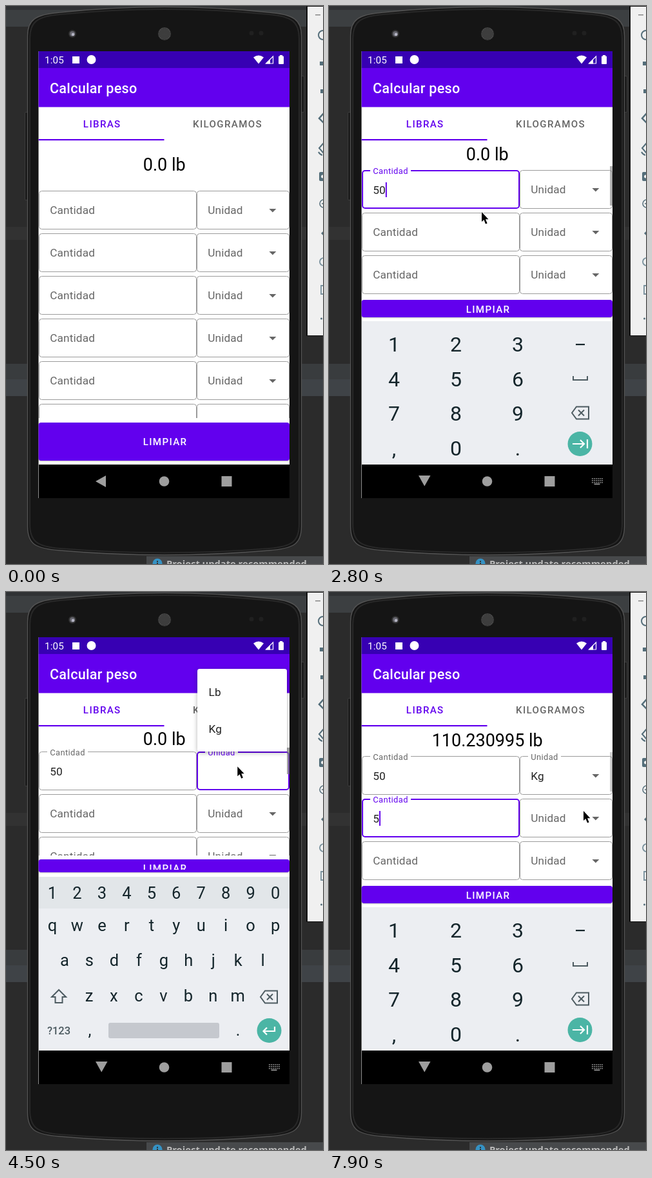
Recreate the animation shown at these times as an HTML page with a canvas. Size 492 px wide and 864 px high, loop 8000 ms.

```html
<!DOCTYPE html>
<html lang="es">
<head>
<meta charset="utf-8">
<title>Calcular peso</title>
<style>
html, body { margin: 0; width: 100%; height: 100%; overflow: hidden; background: #2b2b2b; }
canvas { display: block; }
</style>
</head>
<body>
<canvas id="stage" width="492" height="864"></canvas>
<script>
const ctx = document.getElementById('stage').getContext('2d');
const LOOP = 8000;
const PURPLE = '#6200ee', HINT = '#666', INK = '#212121', KEY = '#14252b', ICON = '#4d5b61', TEAL = '#4bb5a5';

const T = {
  focus1: 1050, type5: 2600, type0: 2800, openMenu: 4012, letters: 4300,
  pickKg: 5200, closeMenu: 5250, focus2: 5750, digits: 5950, typeSecond: 6880
};
const LAYOUT = {
  none: { total: 255, row: 286, clip: 638, button: 645, height: 59, label: 680, keyboard: 710 },
  digits: { total: 239, row: 254, clip: 448, button: 455, height: 27, label: 475, keyboard: 488 },
  letters: { total: 237, row: 247, clip: 408, button: 414, height: 20, label: 433, keyboard: 441 }
};
// time, x, y of the pointer tip
const POINTER = [
  [100, 500, 520], [700, 237, 319], [3300, 237, 319], [3800, 363, 272], [4100, 360, 272],
  [4450, 360, 272], [4950, 335, 208], [5180, 335, 208], [5400, 173, 332], [5650, 153, 342],
  [7000, 153, 342], [7700, 395, 339], [8000, 395, 339]
];

const clamp = v => Math.max(0, Math.min(1, v));
const ramp = (t, from, to) => clamp((t - from) / (to - from));
const ease = p => p * p * (3 - 2 * p);
const mix = (a, b, p) => a + (b - a) * p;

function rect(x, y, w, h, color) {
  ctx.fillStyle = color;
  ctx.fillRect(x, y, w, h);
}
function round(x, y, w, h, r, color) {
  ctx.fillStyle = color;
  ctx.beginPath();
  ctx.roundRect(x, y, w, h, r);
  ctx.fill();
}
function circle(x, y, r, color) {
  ctx.fillStyle = color;
  ctx.beginPath();
  ctx.arc(x, y, r, 0, 7);
  ctx.fill();
}
function fill(d, color) {
  ctx.fillStyle = color;
  ctx.fill(new Path2D(d));
}
function stroke(d, color, width = 2) {
  ctx.strokeStyle = color;
  ctx.lineWidth = width;
  ctx.stroke(new Path2D(d));
}
function text(str, x, y, size, color, { weight = 400, align = 'left', spacing = 0, family = 'Roboto' } = {}) {
  ctx.font = `${weight} ${size}px ${family}, sans-serif`;
  ctx.letterSpacing = spacing + 'px';
  ctx.textAlign = align;
  ctx.fillStyle = color;
  ctx.fillText(str, x, y);
}
function clipped(x, y, w, h, draw) {
  ctx.save();
  ctx.beginPath();
  ctx.rect(x, y, w, h);
  ctx.clip();
  draw();
  ctx.restore();
}
const caps = (str, x, y, color) => text(str, x, y, 15.1, color, { weight: 500, align: 'center', spacing: 1.35 });

function drawDesktop() {
  rect(0, 0, 492, 864, '#2b2b2b');
  rect(0, 0, 492, 6, '#303234');
  rect(0, 6, 492, 26, '#3c3f41');
  rect(0, 342, 492, 20, '#323232');
  rect(0, 554, 492, 24, '#393c3e');
  rect(0, 578, 492, 26, '#3f4347');
  rect(218, 852, 274, 12, '#47494b');
  circle(235, 863, 7.5, '#3592c4');
  rect(234, 859, 2, 2, '#333');
  rect(234, 862, 2, 2, '#333');
  text('Project update recommended', 249, 868.5, 14.7, '#bbb', { weight: 700, family: 'Open Sans' });
}

function drawToolbar() {
  rect(466, 0, 26, 511, '#111');
  rect(468, 1, 24, 509, '#f0f0f0');
  const c = '#546e7a';
  rect(480, 13, 8, 1.5, '#888');
  stroke('M492 38 A7 7 0 0 0 492 52', c);
  rect(487, 86, 5, 6, c);
  rect(488, 129, 4, 6, c);
  stroke('M493 166 L486 174 L493 181', c, 2.5);
  stroke('M493 212 L486 220 L493 228 M485 226 Q487 230 491 231', c);
  round(486, 257, 8, 14, 2, c);
  circle(491.5, 264, 2.5, '#f0f0f0');
  stroke('M493 300 A6 6 0 0 0 493 312 M490 306 H492', c, 1.5);
  fill('M489 352 L493 348 V356 Z', c);
  stroke('M493 390 A6 6 0 0 0 493 402', '#78909c', 1.8);
  stroke('M493 433 H489 V446 H493', '#78909c', 1.8);
  circle(489.5, 484, 1.5, c);
}

function drawPhone() {
  round(29, 164, 6, 137, 2, '#3b3b3b');
  round(30, 165, 3, 135, 1, '#1a1a1a');
  round(457, 108, 6, 57, 2, '#3b3b3b');
  round(458, 109, 4, 55, 1, '#1a1a1a');
  const body = 'M33.5 46 C33.5 22 45 13 84 10 Q246 -7 408 10 C447 13 458.5 22 458.5 46 V806 C458.5 833 447 840 408 843 Q246 857 84 843 C45 840 33.5 833 33.5 806 Z';
  fill(body, '#151515');
  stroke(body, '#525252', 1.4);
  stroke('M37 50 C37 25 48 16 84 13 Q246 -3 408 13 C444 16 455 25 455 50 V802 C455 829 444 837 408 840 Q246 853 84 840 C48 837 37 829 37 802 Z', '#282828', 2);
  circle(103, 43, 6, '#303030');
  circle(103, 43, 4, '#65656d');
  circle(104, 44, 2.3, '#b5b5c4');
  circle(381, 42, 3.5, '#202020');
  circle(396, 42, 3.5, '#202020');
  circle(246, 43, 10, '#464646');
  for (let i = -4; i <= 4; i++)
    for (let j = -4; j <= 4; j++)
      if (i * i + j * j < 18) rect(245.5 + i * 2.1, 42.5 + j * 2.1, 1, 1, '#232323');
}

function drawHeader() {
  rect(50.5, 70, 389.5, 26, '#3700b3');
  rect(50.5, 96, 389.5, 60.5, PURPLE);
  text('1:05', 60, 89, 15.2, '#fff', { spacing: 0.2 });
  rect(103, 78, 11, 11, '#fff');
  circle(132.5, 83, 7, '#fff');
  fill('M384 79.5 Q392 73.5 400 79.5 L392 89.5 Z', '#fff');
  stroke('M403.5 89 H414.5 V78 Z', '#fff', 1.2);
  fill('M403 89.5 L410 82.5 V89.5 Z', '#fff');
  round(423, 77.5, 8, 12.5, 1, '#fff');
  rect(425, 76, 4, 2, '#fff');
  text('Calcular peso', 68, 135, 21.6, '#fff', { weight: 500, spacing: 0.27 });
  caps('LIBRAS', 149.2, 188, PURPLE);
  caps('KILOGRAMOS', 344, 188, HINT);
  rect(50.5, 206, 195, 2.2, PURPLE);
}

// Outlined text field whose hint floats onto the border as `lift` goes from 0 to 1.
function field(x, y, w, hint, { lift = 0, focused = false, value = '', arrow = false, caret = false, ripple } = {}) {
  if (ripple) clipped(x + 1, y + 1, w - 2, 58, ripple);
  const inset = focused ? 1 : 0.5;
  ctx.strokeStyle = focused ? PURPLE : '#9b9b9b';
  ctx.lineWidth = inset * 2;
  ctx.beginPath();
  ctx.roundRect(x + inset, y + inset, w - inset * 2, 60 - inset * 2, 4);
  ctx.stroke();
  if (lift) rect(x + 13, y - 1, hint === 'Cantidad' ? 63 : 51, 3, '#fff');
  text(hint, x + 17.2, y + mix(36, 6, lift), mix(17.2, 12.9, lift), focused ? PURPLE : HINT, { spacing: mix(0.16, 0.4, lift) });
  text(value, x + 17.2, y + 37, 17.2, INK, { spacing: 0.16 });
  if (caret) rect(x + 17 + value.length * 9.9, y + 19, 2, 23, PURPLE);
  if (arrow) fill(`M${x + 112.4} ${y + 28} h11 l-5.5 5.5 z`, HINT);
}

function drawRows(t, layout) {
  const blink = since => Math.floor((t - since) / 500) % 2 === 0;
  const menuFocus = t >= T.openMenu && t < T.focus2;
  const firstFocus = t >= T.focus1 && t < T.openMenu;
  const secondFocus = t >= T.focus2;
  const float = start => ease(ramp(t, start, start + 167));
  const typed = t < T.type5 ? '' : t < T.type0 ? '5' : '50';
  const firstEdit = t < T.type5 ? T.focus1 : t < T.type0 ? T.type5 : T.type0;
  const rippleAlpha = 0.18 * (1 - ramp(t, 4200, 4500));
  const ripple = () => circle(366, 282, 104 * ramp(t, 3990, 4175), `rgba(0,0,0,${rippleAlpha})`);

  clipped(50, 208, 390, layout.clip - 208, () => {
    for (let i = 0; i < 6; i++) {
      const y = layout.row + i * 66;
      let amount = {}, unit = { arrow: true };
      if (i === 0) {
        amount = { lift: float(T.focus1), focused: firstFocus, value: typed, caret: firstFocus && blink(firstEdit) };
        unit = {
          lift: float(T.openMenu), focused: menuFocus, arrow: !menuFocus, value: t >= T.pickKg ? 'Kg' : '',
          ripple: menuFocus && t < 4500 ? ripple : null
        };
      } else if (i === 1) {
        const edited = t >= T.typeSecond;
        amount = {
          lift: float(T.focus2), focused: secondFocus, value: edited ? '5' : '',
          caret: secondFocus && blink(edited ? T.typeSecond : T.focus2)
        };
      }
      field(51, y, 245, 'Cantidad', amount);
      field(296, y, 144, 'Unidad', unit);
    }
  });
}

function drawScrollbar(t, mode, layout) {
  let alpha = 0;
  if (t >= T.focus1 && t < 3200) alpha = 1 - ramp(t, 2750, 3100);
  else if (t >= 4050) alpha = 1 - 0.8 * ramp(t, 7750, 8000);
  const height = mode === 'letters' ? 41 : 61;
  if (mode !== 'none') rect(436, layout.row - 6, 4, height, `rgba(120,120,120,${alpha * 0.65})`);
}

function drawButton(layout) {
  ctx.save();
  ctx.shadowColor = 'rgba(0,0,0,.25)';
  ctx.shadowBlur = 2;
  ctx.shadowOffsetY = 1;
  round(50.5, layout.button, 389.5, layout.height, 4, PURPLE);
  ctx.restore();
  clipped(51, layout.button, 389, layout.height - 4, () => caps('LIMPIAR', 247, layout.label, '#fff'));
}

function backspaceIcon(x, y) {
  stroke(`M${x - 13} ${y} l7 -9.5 h19 v19 h-19 z M${x - 3} ${y - 4.5} l9 9 m0 -9 l-9 9`, ICON, 2);
}

function drawDigitKeys() {
  rect(51, 488, 389, 222, '#eceef2');
  ['123', '456', '789', ',0.'].forEach((row, r) => {
    [...row].forEach((key, c) => text(key, 101 + c * 96, 535 + r * 53.7, 32, KEY, { align: 'center' }));
  });
  rect(383, 523, 14, 2.2, KEY);
  stroke('M379 573 V579 H401 V573', ICON, 2);
  backspaceIcon(390, 630);
  circle(389.5, 678, 19, TEAL);
  stroke('M378 678 H396 M390 672 L396 678 L390 684 M401 671 V685', '#fff', 2.2);
}

function drawLetterKeys() {
  rect(51, 441, 389, 269, '#eceef2');
  rect(51, 441, 389, 49, '#e2e6e9');
  const rows = [['1234567890', 72, 475], ['qwertyuiop', 72, 525], ['asdfghjkl', 91, 579], ['zxcvbnm', 129, 634]];
  rows.forEach(([keys, x, y]) => {
    [...keys].forEach((key, i) => text(key, x + i * 38.45, y, 25.5, KEY, { align: 'center' }));
  });
  stroke('M82 616 L71 627 H76.5 V636 H87.5 V627 H93 Z', ICON, 2);
  backspaceIcon(408, 627);
  text('?123', 82, 685, 16.5, ICON, { align: 'center', weight: 500 });
  text(',', 130, 687, 25, KEY, { align: 'center' });
  text('.', 360, 687, 25, KEY, { align: 'center' });
  round(159, 667, 172, 24, 3, '#c5c8ce');
  circle(408.5, 679, 19, TEAL);
  stroke('M417 673 V680 H400 M405 674.5 L399.5 680 L405 685.5', '#fff', 2.2);
}

function drawMenu(t, mode) {
  if (t < 4040 || t > 5420) return;
  const show = ramp(t, 4040, 4150), hide = ramp(t, T.closeMenu, 5410);
  const below = mode === 'digits';
  const top = below ? 315 : 119, anchor = below ? 315 : 247;
  const scale = mix(0.93, 1, show) - 0.07 * hide;
  ctx.save();
  ctx.globalAlpha = show * (1 - hide);
  ctx.translate(366.5, anchor);
  ctx.scale(scale, scale);
  ctx.translate(-366.5, -anchor);
  // The shadow is kept outside the sheet so it does not show through while fading.
  ctx.save();
  ctx.beginPath();
  ctx.rect(270, 60, 200, 420);
  ctx.roundRect(297, top, 139, 128, 4);
  ctx.clip('evenodd');
  ctx.shadowColor = 'rgba(0,0,0,.3)';
  ctx.shadowBlur = 7;
  ctx.shadowOffsetY = 2;
  round(297, top, 139, 128, 4, '#fff');
  ctx.restore();
  round(297, top, 139, 128, 4, '#fff');
  text('Lb', 314.5, top + 41.5, 17.2, INK, { spacing: 0.16 });
  text('Kg', 314.5, top + 98.5, 17.2, INK, { spacing: 0.16 });
  ctx.restore();
}

function drawNavigation(open) {
  const gray = '#9e9e9e';
  rect(51, 710, 389, 52, '#000');
  fill(open ? 'M139 727 H157.5 L148.2 743.5 Z' : 'M139 736 L155 727 V745 Z', gray);
  circle(245.5, 736, 7.8, gray);
  rect(334.5, 728, 16, 16, gray);
  if (!open) return;
  for (let r = 0; r < 3; r++)
    for (let c = 0; c < 6; c++) rect(408 + c * 3, 731 + r * 3, 1.6, 1.6, gray);
  rect(411.5, 739.5, 9, 1.6, gray);
}

function drawPointer(t) {
  if (t < POINTER[0][0]) return;
  const i = POINTER.findIndex(p => p[0] > t);
  const [t0, x0, y0] = POINTER[i - 1], [t1, x1, y1] = POINTER[i];
  const p = ease(ramp(t, t0, t1));
  ctx.save();
  ctx.translate(mix(x0, x1, p), mix(y0, y1, p));
  const arrow = 'M0 0 V15 L3.4 12 L6 18.5 L8.6 17.4 L6 11.2 H10.4 Z';
  stroke(arrow, '#fff', 1.8);
  fill(arrow, '#000');
  ctx.restore();
}

function draw(t) {
  const mode = t < T.focus1 ? 'none' : t >= T.letters && t < T.digits ? 'letters' : 'digits';
  const layout = LAYOUT[mode];
  drawDesktop();
  drawToolbar();
  drawPhone();
  rect(50.5, 70, 389.5, 692, '#fff');
  drawHeader();
  text(t >= T.pickKg ? '110.230995 lb' : '0.0 lb', 245.7, layout.total, 27, '#000', { align: 'center' });
  drawRows(t, layout);
  drawScrollbar(t, mode, layout);
  drawButton(layout);
  if (mode !== 'none') clipped(51, 400, 389, 310, () => {
    ctx.translate(0, 222 * (1 - ease(ramp(t, T.focus1, 1300))));
    mode === 'letters' ? drawLetterKeys() : drawDigitKeys();
  });
  drawMenu(t, mode);
  drawNavigation(mode !== 'none');
  drawPointer(t);
}

const start = performance.now();
function tick() {
  draw((performance.now() - start) % LOOP);
  requestAnimationFrame(tick);
}
tick();
</script>
</body>
</html>
```
